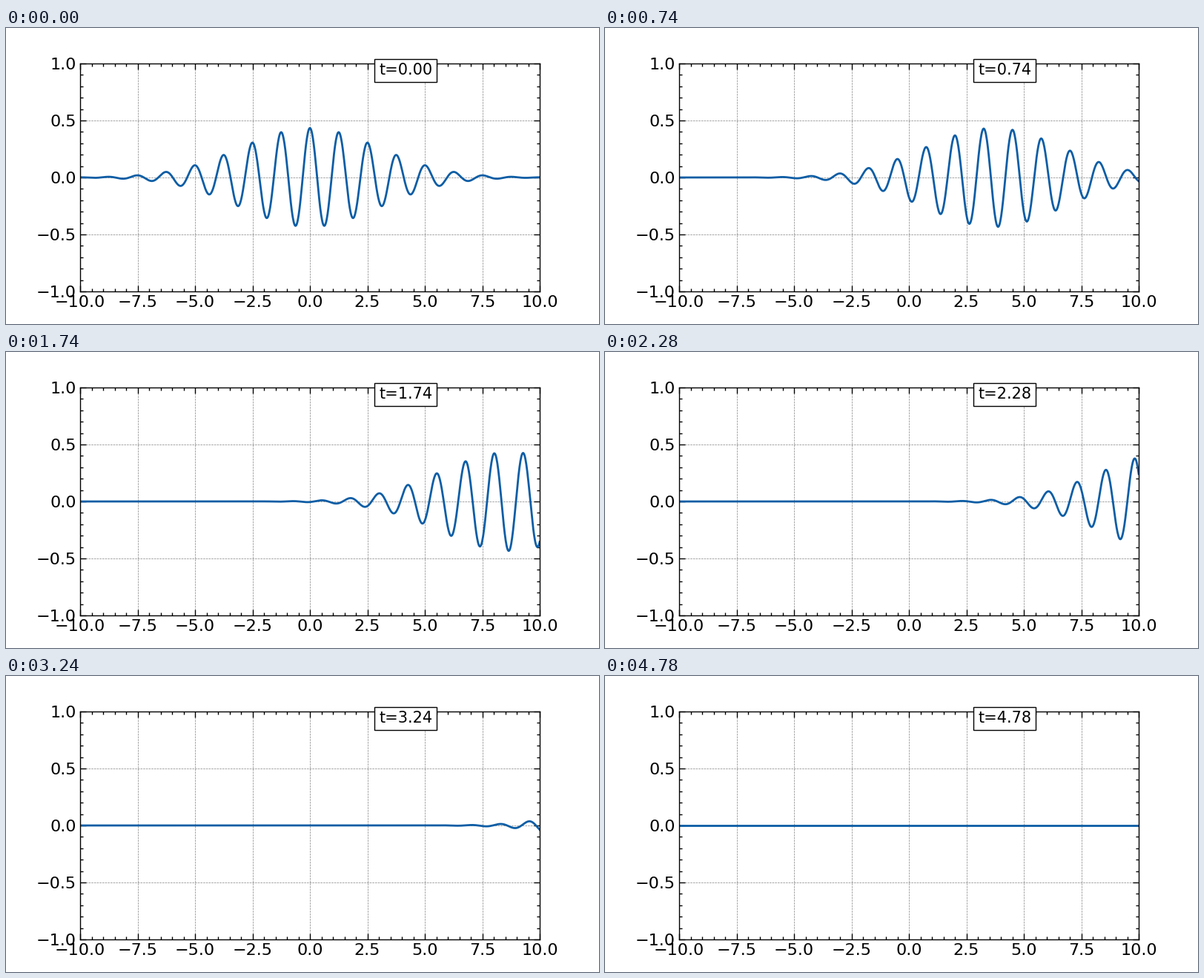
A matplotlib script that plays this animation: 800x400 px, repeating every 4800 ms.

```python
import numpy as np
import matplotlib.pyplot as plt
from matplotlib.animation import FuncAnimation
from matplotlib.ticker import AutoMinorLocator

FRAMES = 240
INTERVAL = 20  # ms
SIGMA = 3.0    # width of the envelope
K = 5.0        # wave number, also the speed of the envelope
OMEGA = 5.0

plt.rcParams.update({"font.family": "DejaVu Sans", "font.size": 16})


def packet(x, t):
    """Normalised Gaussian packet whose crests travel slower than its envelope."""
    norm = (np.pi * SIGMA**2) ** -0.25
    envelope = np.exp(-(x - K * t) ** 2 / (2 * SIGMA**2))
    return norm * envelope * np.cos(K * x - OMEGA * t)


fig = plt.figure(figsize=(8, 4), dpi=100, facecolor="white")
ax = fig.add_axes([0.125, 0.11, 0.775, 0.77])
ax.set_xlim(-10, 10)
ax.set_ylim(-1, 1)
ax.set_xticks(np.linspace(-10, 10, 9))
ax.set_yticks(np.linspace(-1, 1, 5))
for axis in (ax.xaxis, ax.yaxis):
    axis.set_minor_locator(AutoMinorLocator(5))

ax.tick_params(which="both", direction="in", top=True, right=True, width=1)
ax.tick_params(which="major", length=6, labelsize=16)
ax.tick_params(which="minor", length=3)
ax.grid(True, linestyle="--", color="black", alpha=0.5, linewidth=0.5)
for spine in ax.spines.values():
    spine.set_linewidth(1)

x = np.linspace(-10, 10, 1000)
curve, = ax.plot(x, packet(x, 0), color="#0C5DA5", linewidth=2)
clock = ax.text(3, 0.9, "t=0.00", fontsize=15,
                bbox=dict(facecolor="white", edgecolor="black", linewidth=1))


def update(i):
    t = i * INTERVAL / 1000
    curve.set_ydata(packet(x, t))
    clock.set_text(f"t={t:.2f}")
    return curve, clock


anim = FuncAnimation(fig, update, frames=FRAMES, interval=INTERVAL,
                     repeat=True, repeat_delay=0)
plt.show()
```
